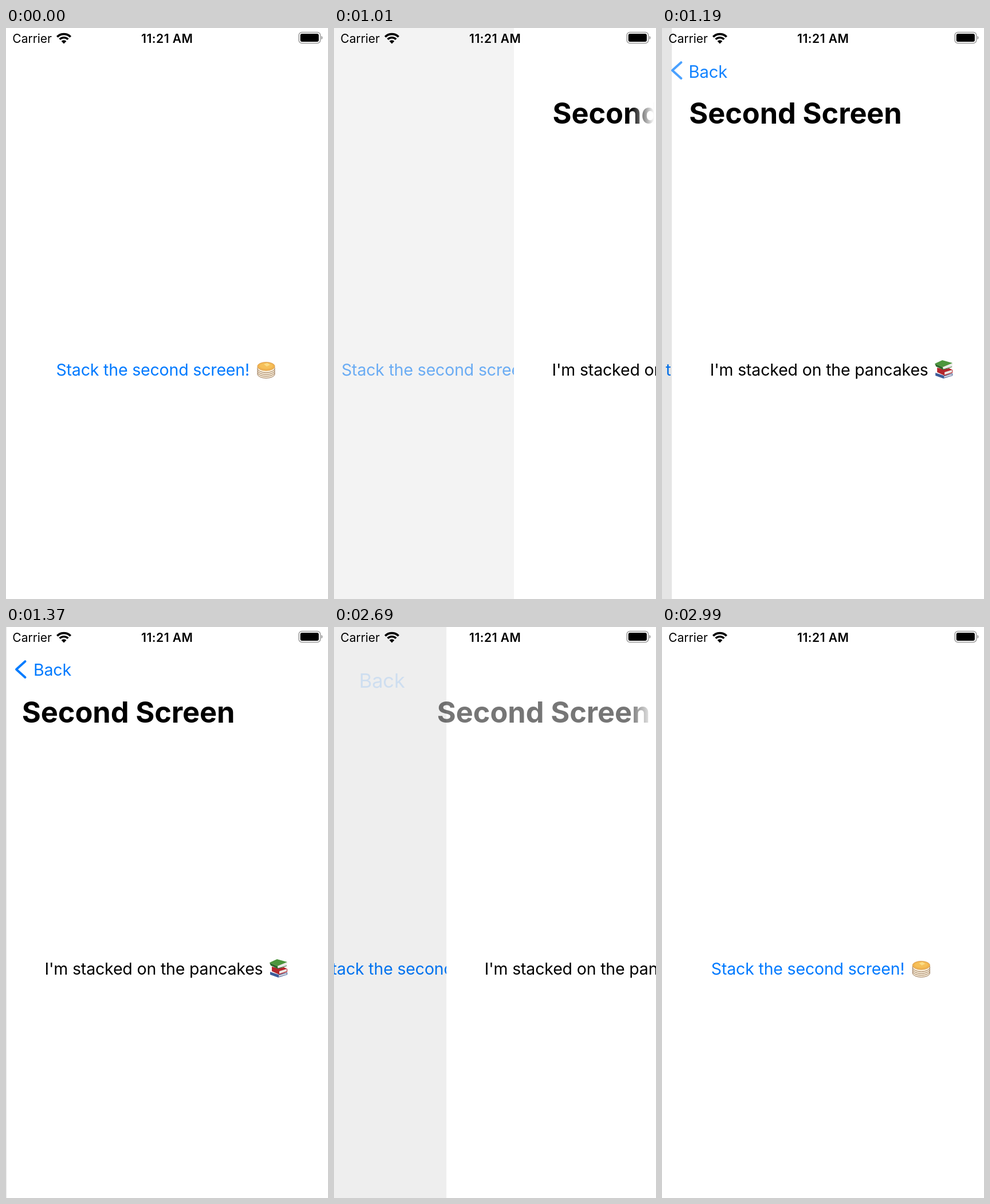
Write an HTML page that moves like this. It is 562x997 px and loops after 3100 ms.

```html
<!DOCTYPE html>
<html lang="en">
<head>
<meta charset="utf-8">
<title>Stack navigation</title>
<style>
  html, body { margin: 0; width: 100%; height: 100%; overflow: hidden; background: #fff; }
  svg { display: block; width: 100vw; height: 100vh; }
  text { font: 28.5px Inter, sans-serif; letter-spacing: -.17px; white-space: pre; }
  .title { font-size: 50.5px; font-weight: 700; letter-spacing: -.1px; }
  .status { font-size: 21px; letter-spacing: 0; }
  .clock { font-weight: 600; letter-spacing: .5px; text-anchor: middle; }
  .link { fill: #007aff; }
</style>
</head>
<body>
<svg viewBox="0 0 562 997">
  <defs>
    <ellipse id="pancake" cx="16" rx="15.3" ry="7.6" fill="#fbf0dc" stroke="#8a6544" stroke-width=".9"/>
    <linearGradient id="fade" gradientUnits="userSpaceOnUse" x1="518" x2="559" y1="0" y2="0">
      <stop stop-color="#fff"/><stop offset="1" stop-color="#000"/>
    </linearGradient>
    <mask id="edgeFade" maskUnits="userSpaceOnUse" x="0" y="0" width="562" height="997">
      <rect width="562" height="997" fill="url(#fade)"/>
    </mask>
  </defs>
  <rect width="562" height="997" fill="#fff"/>

  <g id="first">
    <text class="link" x="87.4" y="606.5">Stack the second screen!</text>
    <g transform="translate(438 582)">
      <use href="#pancake" y="21.8"/>
      <use href="#pancake" y="18.6"/>
      <use href="#pancake" y="15.4"/>
      <use href="#pancake" y="12.2"/>
      <ellipse cx="16" cy="8.8" rx="15.2" ry="7.4" fill="#f1b450" stroke="#d69a4b" stroke-width=".8"/>
      <ellipse cx="16" cy="8" rx="11.5" ry="5" fill="#f6c059"/>
      <path d="M12 5l6-2 5 3-6 3z" fill="#fbdc86"/>
    </g>
  </g>
  <rect id="dim" width="562" height="997"/>

  <g id="second">
    <rect width="562" height="997" fill="#fff"/>
    <text x="66.5" y="606.5">I'm stacked on the pancakes</text>
    <g transform="translate(458 580)">
      <path d="M2 22l15 5 15-4v4l-16 5-14-5z" fill="#3d5c99"/>
      <path d="M17 28.3l14-4v2.2l-14 4z" fill="#e4e2e4"/>
      <path d="M5 13l11 3 10-2 6 3v5l-14 5-13-6z" fill="#b3262c"/>
      <path d="M18 21l13-4v4l-13 4.4z" fill="#eceae8"/>
      <path d="M1 6l14 6 1 5L3 11z" fill="#2d6a2b"/>
      <path d="M15 12l17-6-1 5-15 5z" fill="#eceae8"/>
      <path d="M1 6L14 0l18 5-17 7z" fill="#4c963c"/>
      <path d="M15 16.5l16-5" stroke="#2d6a2b"/>
    </g>
  </g>

  <g mask="url(#edgeFade)"><text id="title" class="title" x="26.7" y="166.7">Second Screen</text></g>
  <path id="chevron" d="M33.5 60L18 74l15.5 14" fill="none" stroke="#007aff" stroke-width="4" stroke-linecap="round" stroke-linejoin="round"/>
  <text id="back" class="link" x="-2.4" y="10.4">Back</text>

  <g>
    <text class="status" x="11.3" y="26">Carrier</text>
    <g fill="none" stroke="#000" stroke-width="3.7">
      <path d="M89.3 15.5a16.5 16.5 0 0 1 23.4 0M93.7 19.8a10.3 10.3 0 0 1 14.6 0"/>
      <path d="M101 27.5l-4.4-4.4a6.2 6.2 0 0 1 8.8 0z" fill="#000" stroke="none"/>
    </g>
    <text class="status clock" x="281.3" y="26">11:21 AM</text>
    <rect x="511.2" y="7.6" width="37.4" height="18.8" rx="5" fill="none" stroke="#999" stroke-width="1.5"/>
    <rect x="513.7" y="10.1" width="32.2" height="13.9" rx="3"/>
    <path d="M550.3 13.8a3.4 3.4 0 0 1 0 6.4z" fill="#999"/>
  </g>
</svg>
<script>
const WIDTH = 562, LOOP = 3100, PUSH = 898, POP = 2622.5, NAV_LAG = 11.5;
// Each picture holds until the next of these moments.
const STEPS = [0, 800, 880, 980, 1090, 1190, 1240, 1370, 2530, 2690, 2790, 2890, 2990];

const $ = id => document.getElementById(id);
const clamp = v => Math.min(1, Math.max(0, v));
const move = (id, x, y = 0, scale = 1) =>
  $(id).setAttribute('transform', `translate(${x} ${y}) scale(${scale})`);
const fade = (id, opacity) => $(id).setAttribute('opacity', clamp(opacity));

// Critically damped spring: starts at 1, settles at 0.
function spring(ms) {
  const u = 18.26 * Math.max(0, ms) / 1000;
  return (1 + u) * Math.exp(-u);
}

function draw(t) {
  const popping = t >= 2530;
  // Share of the width by which the second screen is shifted right.
  const shift = lag => popping ? 1 - spring(t - POP - lag) : spring(t - PUSH - lag);
  const page = shift(0), nav = shift(NAV_LAG);

  move('first', -0.3 * WIDTH * (1 - page));
  fade('first', t < 800 ? 1 : 0.2 + 0.8 * clamp((t - 840) / 310));
  fade('dim', 0.105 * (1 - page));
  move('second', WIDTH * page);

  move('title', WIDTH * nav);
  fade('title', popping ? 1 - 1.7 * nav : 1);
  move('back', 50.4 - (popping ? 14 : 40) * nav, 74 + 72 * nav, 1 + 0.79 * nav);
  fade('back', popping ? 0.2 * (1 - 1.3 * nav) : 1 - 2 * nav);
  fade('chevron', (popping ? 0.2 : 1) * (1 - 8 * nav));
}

function tick() {
  const t = performance.now() % LOOP;
  draw(STEPS.findLast(step => step <= t));
  requestAnimationFrame(tick);
}
tick();
</script>
</body>
</html>
```
